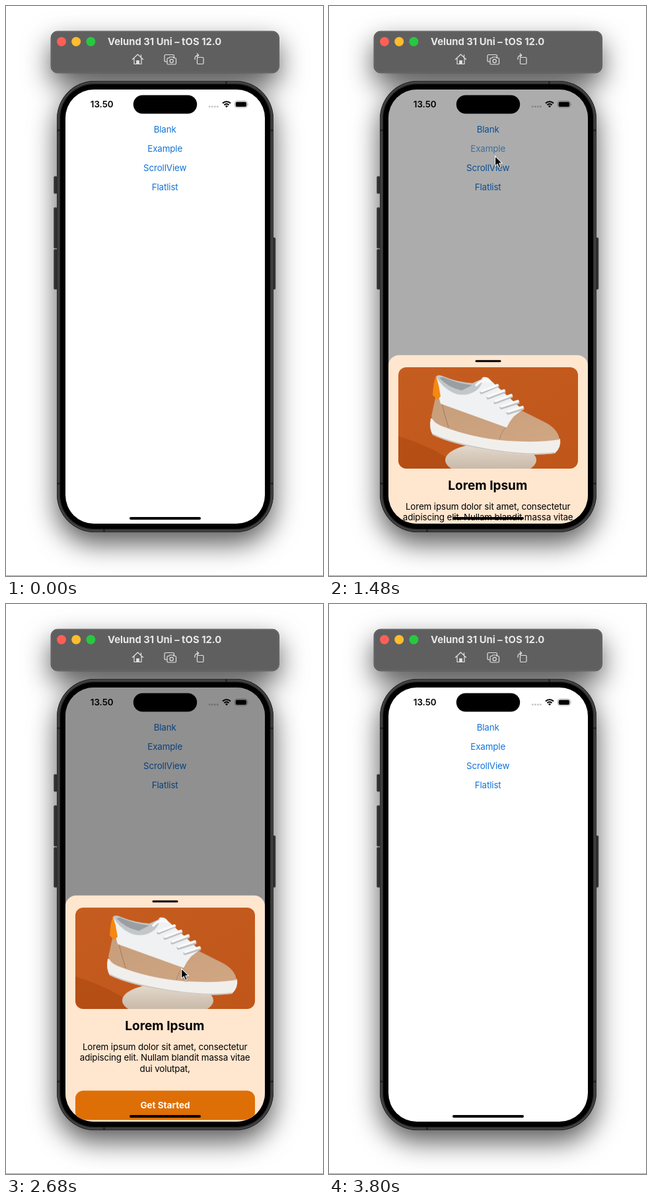
Recreate the animation shown at these times as an HTML page. Size 480 by 860 pixels, loop 4.28 s.

```html
<!DOCTYPE html>
<html lang="en">
<head>
<meta charset="utf-8">
<title>Bottom sheet demo</title>
<style>
  @property --y { syntax: '<number>'; inherits: true; initial-value: 393; }

  html, body { margin: 0; width: 100%; height: 100%; overflow: hidden; background: #fff; }
  svg { display: block; width: 480px; height: 860px; }
  text { font-family: Inter, "Open Sans", sans-serif; }
  .mid { text-anchor: middle; }
  .title { font-size: 14.8px; font-weight: 700; fill: #e8e8e8; }
  .clock { font-size: 13.3px; font-weight: 600; }
  .copy { font-size: 13.4px; letter-spacing: -.14px; }
  .link { fill: #1474d8; }
  .head { font-size: 19px; font-weight: 700; }
  .cta { font-size: 13.5px; font-weight: 700; fill: #fff; }
  .shadow { filter: drop-shadow(0 17px 20px rgba(0, 0, 0, .66)); }
  .icon { fill: none; stroke: #e2e2e2; stroke-width: 1.2; stroke-linecap: round; stroke-linejoin: round; }

  .screen, .pressed, .photo, .cursor, .pointer { animation: 4280ms linear infinite; }
  .screen { animation-name: sheet; }
  .pressed { animation-name: press; }
  .photo { animation-name: load; animation-timing-function: step-end; }
  .cursor { animation-name: travel; }
  .pointer { animation-name: show; animation-timing-function: step-end; }

  /* --y is how far the sheet sits below its open position */
  .sheet { transform: translateY(calc(var(--y) * 1px)); }
  .dim { opacity: calc((393 - var(--y)) / 786); }

  @keyframes sheet {
    0% { --y: 393; }
    30.96% { --y: 393; animation-timing-function: cubic-bezier(.455, .03, .515, .955); }
    37.29% { --y: 0; }
    55.61% { --y: 0; animation-timing-function: cubic-bezier(.32, 0, .67, 0); }
    64.95% { --y: 121; }
    67.76% { --y: 341.5; animation-timing-function: cubic-bezier(.2, .72, .4, 1); }
    70.09%, 100% { --y: 393; }
  }
  @keyframes press {
    0%, 27.57% { opacity: 1; }
    29.91%, 32.24% { opacity: .22; }
    36.45%, 100% { opacity: 1; }
  }
  @keyframes load {
    0% { opacity: 0; }
    32.7%, 100% { opacity: 1; }
  }
  @keyframes travel {
    0%, 1.4% { transform: translate(404px, 824px); animation-timing-function: cubic-bezier(.2, .5, .6, .95); }
    14.02% { transform: translate(262px, 276px); animation-timing-function: ease-out; }
    26.17%, 33.18% { transform: translate(251px, 217px); animation-timing-function: ease-in; }
    36.92% { transform: translate(251px, 260px); animation-timing-function: ease-in-out; }
    49.53% { transform: translate(260px, 452px); }
    54.67% { transform: translate(260px, 452px); animation-timing-function: cubic-bezier(.32, 0, .67, 0); }
    64.95% { transform: translate(271px, 660px); animation-timing-function: ease-out; }
    66.36%, 68.22% { transform: translate(271px, 688px); animation-timing-function: ease-in; }
    78.04%, 100% { transform: translate(300px, 22px); }
  }
  @keyframes show {
    0% { opacity: 0; }
    1.4% { opacity: 1; }
    78.48%, 100% { opacity: 0; }
  }
</style>
</head>
<body>
<svg viewBox="0 0 480 860">
  <defs>
    <clipPath id="glass"><rect x="90" y="126" width="302" height="655" rx="43"/></clipPath>
    <clipPath id="card"><rect width="272" height="153" rx="12"/></clipPath>
    <linearGradient id="wall" x1="0" y1="0" x2="1" y2="1">
      <stop offset="0" stop-color="#c65d20"/>
      <stop offset="1" stop-color="#c05619"/>
    </linearGradient>
    <linearGradient id="rock" x1="0" y1="0" x2="0" y2="1">
      <stop offset="0" stop-color="#e6dccf"/>
      <stop offset="1" stop-color="#bfae9c"/>
    </linearGradient>
    <linearGradient id="suede" x1="0" y1="0" x2="1" y2="1">
      <stop offset="0" stop-color="#c79e7b"/>
      <stop offset="1" stop-color="#d0a683"/>
    </linearGradient>
  </defs>

  <rect width="480" height="860" fill="#fff"/>

  <g class="shadow">
    <rect x="68" y="38" width="345.5" height="63" rx="10" fill="#5f5f5f"/>
    <rect x="77" y="113" width="328" height="681" rx="57" fill="#303030"/>
  </g>
  <rect y="859" width="480" height="1" fill="#a6a6a6"/>

  <!-- toolbar -->
  <rect x="68" y="38" width="345.5" height="63" rx="10" fill="#5f5f5f" stroke="#4a4a4a" stroke-width=".8"/>
  <rect x="68.8" y="38.8" width="343.9" height="61.4" rx="9.4" fill="none" stroke="#747474" stroke-width=".7"/>
  <circle cx="84" cy="53.7" r="7" fill="#ff5f57"/>
  <circle cx="106.2" cy="53.7" r="7" fill="#febc2e"/>
  <circle cx="128.4" cy="53.7" r="7" fill="#28c840"/>
  <text class="title" x="154" y="58.5">Velund 31 Uni – tOS 12.0</text>
  <g class="icon">
    <path d="M191.5 80.5L199.5 73L207.5 80.5M194 79V87.5H205V79M204.5 77V73.8"/>
    <path d="M197.8 87.5V82.5H201.2V87.5Z" fill="#e2e2e2"/>
    <rect x="240" y="73.5" width="14.5" height="10.5" rx="2"/>
    <path d="M245.5 78.5H247L248 77H253L254 78.5H256Q257.5 78.5 257.5 80V86.5Q257.5 88 256 88H245.5Q244 88 244 86.5V80Q244 78.5 245.5 78.5Z" fill="#5f5f5f"/>
    <circle cx="250.7" cy="83" r="2.6"/>
    <rect x="289.5" y="77.5" width="9.5" height="10" rx="1.2"/>
    <path d="M286 80.5Q285.5 74.5 291.5 74.3M289.3 72L291.8 74.3L289.3 76.6"/>
  </g>

  <!-- phone body -->
  <g fill="#303030" stroke="#505050" stroke-width=".6">
    <rect x="72.5" y="257" width="5" height="26" rx="1.5"/>
    <rect x="72.5" y="304" width="5" height="61.5" rx="1.5"/>
    <rect x="72.5" y="367" width="5" height="60.5" rx="1.5"/>
    <rect x="404" y="349.5" width="4" height="78" rx="1.5"/>
  </g>
  <rect x="77.5" y="113.5" width="327" height="680" rx="56.5" fill="#343434" stroke="#262626"/>
  <rect x="78.9" y="114.9" width="324.2" height="677.2" rx="55" fill="none" stroke="#565656" stroke-width=".9"/>
  <path d="M77 187.5H82M400 187.5H405M77 720.5H82M400 720.5H405M333.5 113V118M148.5 789V794" stroke="#222" stroke-width="2.5"/>
  <rect x="82" y="118" width="318" height="671" rx="51" fill="#000"/>

  <g clip-path="url(#glass)">
    <g class="screen">
      <rect x="90" y="126" width="302" height="655" fill="#fff"/>

      <text class="clock" x="127.8" y="153.2">13.50</text>
      <g fill="#c8c8c8">
        <circle cx="308.3" cy="151.8" r="1.5"/>
        <circle cx="312.3" cy="151.8" r="1.5"/>
        <circle cx="316.3" cy="151.8" r="1.5"/>
        <circle cx="320.3" cy="151.8" r="1.5"/>
      </g>
      <g fill="none" stroke="#000" stroke-width="2">
        <path d="M328 146.8A8.6 8.6 0 0 1 340 146.8"/>
        <path d="M330.4 149.4A5 5 0 0 1 337.6 149.4"/>
      </g>
      <path d="M334 153.2L331.9 151A3 3 0 0 1 336.1 151Z"/>
      <rect x="346.4" y="143.4" width="19" height="9.8" rx="3.2" fill="none" stroke="#a2a2a2" stroke-width=".9"/>
      <rect x="347.7" y="144.7" width="16.4" height="7.2" rx="2"/>
      <path d="M366.4 146.7Q368 148.3 366.4 150Z" fill="#a2a2a2"/>

      <g class="copy link mid">
        <text x="240.7" y="190.8">Blank</text>
        <text class="pressed" x="240.7" y="219.8">Example</text>
        <text x="240.7" y="248.8">ScrollView</text>
        <text x="240.7" y="277.8">Flatlist</text>
      </g>

      <rect class="dim" x="90" y="126" width="302" height="655" fill="#000"/>

      <g class="sheet">
        <rect x="90" y="388" width="302" height="420" rx="16" fill="#ffe6cf"/>
        <rect x="221.5" y="395.5" width="39" height="3" rx="1.5"/>

        <g transform="translate(105 406.4)">
          <g class="photo" clip-path="url(#card)">
            <rect width="272" height="153" fill="url(#wall)"/>
            <path d="M0 104Q60 122 96 153H0Z" fill="#a8440f" opacity=".5"/>
            <ellipse cx="140" cy="140" rx="69" ry="26" fill="url(#rock)"/>
            <!-- sole -->
            <path d="M49 77Q46 92 52 102Q80 116 142 126Q200 135 237 130Q247 121 245 108L150 90Z" fill="#f1efec"/>
            <path d="M52 101Q80 115 142 125Q200 134 237 129" fill="none" stroke="#c9c2ba" stroke-width="1.6"/>
            <!-- suede body and toe -->
            <path d="M57 42L50 74Q52 83 64 88Q112 107 165 111Q215 114 244 109Q242 94 224 84L186 65L150 78Z" fill="url(#suede)"/>
            <path d="M164 90Q156 97 153 109" fill="none" stroke="#b08764"/>
            <path d="M65 51Q70 72 76 91" fill="none" stroke="#a37b5a"/>
            <!-- white upper -->
            <path d="M57 14Q74 30 92 40Q112 38 122 22L128 15Q136 14 140 20L188 64L175 74Q168 82 164 91L64 55L57 30Z" fill="#f0f1f2"/>
            <path d="M57 14Q60 10 69 14Q88 22 112 24L128 17Q126 34 108 40Q94 44 82 38Q66 30 57 14Z" fill="#c3c7ca"/>
            <path d="M62 16Q76 31 96 35L112 27Q88 24 68 15Z" fill="#999fa3"/>
            <path d="M57 13Q53 22 52 42L59 49L64 44Q62 28 57 13Z" fill="#f58811"/>
            <!-- laces -->
            <path d="M126 38L150 28M136 46L160 37M147 53L171 44M156 61L181 53M166 69L188 62" fill="none" stroke="#bcc0c3" stroke-width="5" stroke-linecap="round"/>
            <path d="M118 27Q128 16 139 22M126 36L150 27M136 44L160 35M147 51L171 42M156 59L181 51M166 67L188 60" fill="none" stroke="#fafafa" stroke-width="3.6" stroke-linecap="round"/>
          </g>
        </g>

        <text class="head mid" x="240.3" y="591">Lorem Ipsum</text>
        <g class="copy mid">
          <text x="240.7" y="621.3">Lorem ipsum dolor sit amet, consectetur</text>
          <text x="240.7" y="637.8">adipiscing elit. Nullam blandit massa vitae</text>
          <text x="240.7" y="654.3">dui volutpat,</text>
        </g>
        <rect x="105" y="682.6" width="272" height="44.2" rx="12" fill="#de6f06"/>
        <text class="cta mid" x="241" y="709.8">Get Started</text>
      </g>

      <rect x="187" y="771" width="108" height="4" rx="2"/>
    </g>
  </g>

  <rect x="192.8" y="134.5" width="96.4" height="28" rx="14"/>

  <g class="pointer">
    <g class="cursor">
      <path d="M.5 .8V16.2L4.1 12.9L6.6 18.8L9.2 17.7L6.7 11.9H11.5Z" fill="#000" stroke="#fff" stroke-width="1.1" stroke-linejoin="round" style="filter: drop-shadow(0 1px 1px rgba(0,0,0,.35))"/>
    </g>
  </g>
</svg>
</body>
</html>
```
